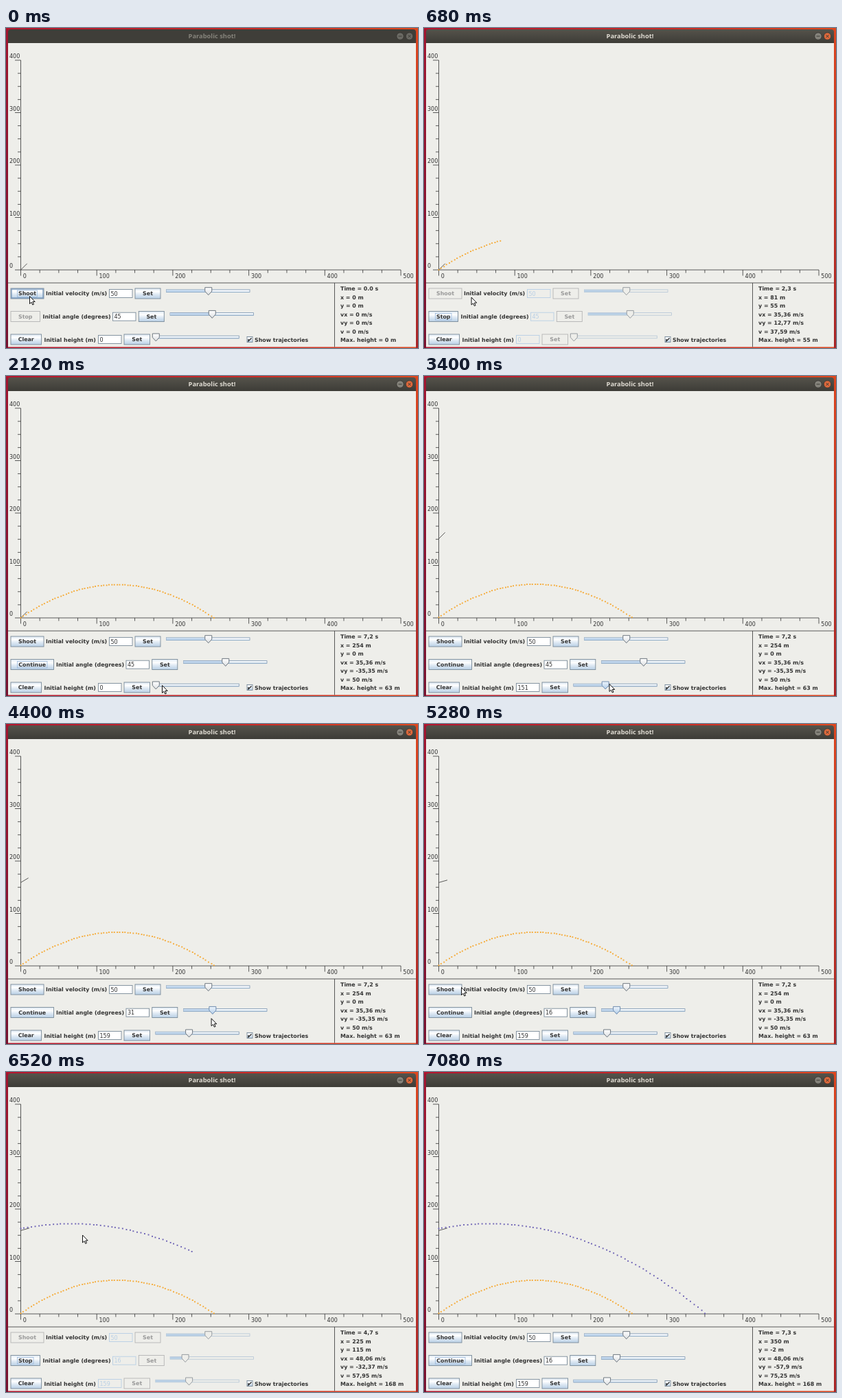
Recreate the animation shown at these times as an HTML page. Size 600 by 467 pixels, loop 8920 ms.

```html
<!DOCTYPE html>
<html lang="en">
<head>
<meta charset="utf-8">
<title>Parabolic shot!</title>
<style>
html, body { margin: 0; width: 100%; height: 100%; overflow: hidden; }
svg { display: block; width: 600px; height: 467px; }
text { font: 8px "DejaVu Sans", sans-serif; fill: #333; white-space: pre; }
.b { font-weight: bold; font-size: 7.9px; }
.title { font: bold 9.3px "Noto Sans", sans-serif; text-anchor: middle; }
.mid { text-anchor: middle; }
</style>
</head>
<body>
<svg viewBox="0 0 600 467">
  <defs>
    <linearGradient id="desk"><stop stop-color="#b3152e"/><stop offset=".6" stop-color="#c92a25"/><stop offset="1" stop-color="#df471e"/></linearGradient>
    <linearGradient id="left" x2="0" y2="1"><stop stop-color="#a01530"/><stop offset="1" stop-color="#76102f"/></linearGradient>
    <linearGradient id="right" x2="0" y2="1"><stop stop-color="#dc451e"/><stop offset="1" stop-color="#a82427"/></linearGradient>
    <linearGradient id="bar" x2="0" y2="1"><stop stop-color="#55534b"/><stop offset="1" stop-color="#3d3c37"/></linearGradient>
    <linearGradient id="btn" x2="0" y2="1"><stop stop-color="#dde8f3"/><stop offset=".3" stop-color="#fff"/><stop offset=".6" stop-color="#dde8f3"/><stop offset="1" stop-color="#b8cfe5"/></linearGradient>
    <linearGradient id="knob" x2="0" y2="1"><stop stop-color="#fff"/><stop offset="1" stop-color="#dcdfe2"/></linearGradient>
    <linearGradient id="knobOn" x2="0" y2="1"><stop stop-color="#eef5fc"/><stop offset="1" stop-color="#b0cce8"/></linearGradient>
  </defs>
  <g id="back"></g>
  <g id="live"></g>
</svg>
<script>
const LOOP = 8920, LAST = 7080, G = 9.82, DT = 0.1, STEP = 22;
const X0 = 21.5, Y0 = 353, SX = 1.107, SY = 0.765;
const BG = '#eeeeea', INK = '#333';

const SHOTS = [
  { start: 160, steps: 72, angle: 45, height: 0, color: '#f6a933' },
  { start: 5465, steps: 73, angle: 16, height: 159, color: '#6b60b4' }
];

// Pointer path: time, x, y
const PATH = [
  [0, 34, 391], [240, 34, 391], [800, 78, 393], [1360, 110, 396], [1520, 110, 396],
  [1920, 222, 454], [2120, 227, 451], [2400, 223.5, 451], [2720, 223.5, 451],
  [3400, 269.5, 449], [3520, 272, 449], [3640, 327, 432], [3720, 308, 419],
  [3920, 317, 418], [4120, 317, 418], [4720, 277.5, 442], [4840, 268, 443],
  [5240, 56, 384], [5280, 54, 384], [5440, 46, 385], [6120, 46, 385], [6760, 150, 149]
];
const HIDE = 6800;

const rect = (x, y, w, h, fill, more = '') =>
  `<rect x="${x}" y="${y}" width="${w}" height="${h}" fill="${fill}" ${more}/>`;
const line = (x1, y1, x2, y2, color = INK, w = 0.8) =>
  `<path d="M${x1} ${y1}L${x2} ${y2}" stroke="${color}" stroke-width="${w}"/>`;
const label = (x, y, s, cls = 'b', color = INK) =>
  `<text x="${x}" y="${y}" class="${cls}" style="fill:${color}">${s}</text>`;
const stroke = (color, w = 0.9) => `stroke="${color}" stroke-width="${w}"`;

function pathAt(t) {
  const i = PATH.findIndex(p => p[0] > t);
  if (i < 0) return PATH[PATH.length - 1].slice(1);
  const [a, x, y] = PATH[i - 1], [b, u, v] = PATH[i];
  const k = (t - a) / (b - a);
  return [x + (u - x) * k, y + (v - y) * k];
}

function axes() {
  let s = line(X0, 47, X0, Y0) + line(X0, Y0, X0 + 500 * SX, Y0);
  for (let m = 0; m <= 500; m += 25) {
    const big = m % 100 === 0, x = X0 + m * SX, y = Y0 - m * SY;
    s += line(x, Y0, x, Y0 + (big ? 8.5 : 4.5));
    if (big) s += label(x + 3.3, 365, m, '');
    if (m > 400) continue;
    s += line(X0, y, X0 - (big ? 8.5 : 4.5), y);
    if (big) s += label(5, y - 3, m, '');
  }
  return s;
}

function background() {
  return rect(0, 0, 600, 467, 'url(#desk)') + rect(0, 2, 3, 465, 'url(#left)') +
    rect(597, 2, 3, 465, 'url(#right)') + rect(3, 20, 594, 445.5, BG) + axes() +
    line(3, 372, 597, 372) + line(478.5, 372, 478.5, 465.5) +
    label(58, 390, 'Initial velocity (m/s)') + label(55.5, 457.5, 'Initial height (m)') +
    rect(351, 450.5, 8, 8, 'url(#btn)', stroke('#7a8a99')) +
    '<path d="M353 454v3L357.500 452.500" fill="none" stroke="#222" stroke-width="1.3"/>' +
    label(362, 457.5, 'Show trajectories');
}

function titleBar(active) {
  const c = active ? '#e06a3c' : '#6b6a64', g = active ? '#85837b' : '#6b6a64';
  const dot = (x, fill, mark) => `<circle cx="${x}" cy="12" r="5.200" fill="${fill}" stroke="#33322e" stroke-width=".7"/>` +
    `<path d="${mark}" stroke="#3b3a35" stroke-width="1"/>`;
  return `<path d="M3 22V6Q3 2 7 2H593Q597 2 597 6V22Z" fill="${active ? 'url(#bar)' : '#3f3e39'}"/>` +
    label(300, 15.2, 'Parabolic shot!', 'title', active ? '#dfdbd2' : '#85837b') +
    dot(574, g, 'M571.5 12h5') + dot(587.5, c, 'M585.500 10l4 4m0-4l-4 4');
}

function button(x, y, w, text, { off, focus, hover } = {}) {
  let s = rect(x, y, w, 15, off ? BG : 'url(#btn)', stroke(off ? '#b4b4b4' : '#7a8a99'));
  if (hover) s += rect(x + 1, y + 1, w - 2, 13, 'none', stroke('#6f8fb5', 1.2));
  if (focus) s += rect(x + 9.5, y + 3, w - 19, 9.5, 'none', stroke('#8fb0d6', 0.7));
  return s + label(x + w / 2, y + 10.4, text, 'b mid', off ? '#999' : INK);
}

function field(x, y, value, off) {
  return rect(x, y, 33.5, 12, off ? BG : '#fff', stroke(off ? '#b8cfe5' : '#7a8a99')) +
    label(x + 2, y + 9, value, '', off ? '#b8cfe5' : INK);
}

function slider(x, y, part, { off, focus } = {}) {
  const k = x + 0.5 + part * 121.5, edge = off ? '#b3c5d6' : '#7a94b0';
  return rect(x, y - 1.8, 121.5, 3.6, off ? BG : '#f4f8fc', stroke(edge, 0.8)) +
    rect(x, y - 1.5, k - x, 3, off ? '#b8cfe5' : '#c3d8ee') +
    (off ? '' : line(x, y + 1.8, x + 121.5, y + 1.8, '#8cabcb', 0.8)) +
    `<path d="M${k - 5} ${y - 5}h10v5.500l-5 5.500l-5-5.500z" fill="${focus ? 'url(#knobOn)' : off ? BG : 'url(#knob)'}" ${stroke(focus ? '#6382a8' : off ? '#8e9399' : '#5f6973')}/>`;
}

function dots(shot, n, lift) {
  const v = 50, a = shot.angle * Math.PI / 180;
  let s = '';
  for (let i = 0; i <= n; i++) {
    const q = i * DT, m = Math.floor(shot.height + v * Math.sin(a) * q - G * q * q / 2);
    const x = X0 + Math.floor(v * Math.cos(a) * q) * SX, y = Math.min(Y0 - m * SY - lift, 353);
    s += rect((x - 0.9).toFixed(1), (y - 0.9).toFixed(1), 1.9, 1.9, shot.color);
  }
  return s;
}

const num = v => String(+v.toFixed(2)).replace('.', ',');

function readout(shot, n) {
  let rows = ['0.0', 0, 0, 0, 0, 0, 0];
  if (shot) {
    const a = shot.angle * Math.PI / 180, q = n * DT;
    const vx = 50 * Math.cos(a), up = 50 * Math.sin(a), vy = up - G * q;
    const high = p => shot.height + up * p - G * p * p / 2;
    rows = [num(q), Math.trunc(vx * q + 1e-6), Math.trunc(high(q)), num(vx), num(vy),
      num(Math.hypot(vx, vy)), Math.trunc(high(Math.min(q, up / G)))];
  }
  const names = ['Time', 'x', 'y', 'vx', 'vy', 'v', 'Max. height'];
  const units = ['s', 'm', 'm', 'm/s', 'm/s', 'm/s', 'm'];
  return names.map((name, i) => label(487, 383.3 + i * 12.52, `${name} = ${rows[i]} ${units[i]}`)).join('');
}

function scene(t) {
  const [cx, cy] = pathAt(t);
  const ramp = (a, b, x0, x1) => Math.max(0, Math.min(1, (pathAt(Math.max(a, Math.min(b, t)))[0] - x0) / (x1 - x0)));
  const height = Math.round(159 * ramp(2720, 3520, 223.5, 272));
  const angle = Math.round(45 - 29 * ramp(4120, 4720, 317, 277.5));
  const count = SHOTS.map(s => Math.min(s.steps, Math.floor((t - s.start) / STEP)));
  const now = count[1] >= 0 ? 1 : count[0] >= 0 ? 0 : -1;
  const shot = SHOTS[now], off = !!shot && count[now] < shot.steps;
  const done = !!shot && !off, shift = done ? 19.5 : 0;
  const onHeight = t >= 2600 && t < 4120, onAngle = t >= 4120 && t < 5420;
  const focusRun = !!shot && !onHeight && !onAngle;

  const r = angle * Math.PI / 180, ly = Y0 - height * SY;
  let s = titleBar(t >= 80) + line(X0, ly, X0 + 13 * Math.cos(r), ly - 13 * Math.sin(r));
  SHOTS.forEach((p, i) => { if (count[i] >= 0) s += dots(p, count[i], i ? 3 : t >= 2720 ? 0.9 : 0.2); });

  s += button(7, 380, 48, 'Shoot', { off, hover: !shot || (t >= 5400 && t < SHOTS[1].start), focus: !shot }) +
    field(150.5, 381.5, 50, off) + button(188, 380, 37, 'Set', { off }) + slider(233.5, 383.7, 0.5, { off });

  s += button(7, 413.5, done ? 62.5 : 42.5, done ? 'Continue' : 'Stop', { off: !shot, focus: focusRun }) +
    label(53.5 + shift, 424, 'Initial angle (degrees)') + field(155.5 + shift, 415.2, angle, off) +
    button(193.3 + shift, 413.5, 37, 'Set', { off }) +
    slider(239 + shift, 417.4, angle / 90, { off, focus: onAngle });

  s += button(7, 447, 44.5, 'Clear') + field(134.5, 448.5, height, off) +
    button(172, 447, 37.5, 'Set', { off }) + slider(217.8, 451, height / 400, { off, focus: onHeight });

  s += readout(shot, count[now]);
  if (t < HIDE) s += `<path transform="translate(${cx} ${cy})" d="M.500 .500V11.500L3 9.200L4.800 13L6.500 12.200L4.800 8.500H8.200Z" fill="#fff" stroke="#111" stroke-width="1"/>`;
  return s;
}

// Pictures change 15 times a second on a 40 ms grid.
function snap(t) {
  const r = t % 200;
  return Math.min(LAST, t - r + (r >= 120 ? 120 : r >= 80 ? 80 : 0));
}

const live = document.getElementById('live');
document.getElementById('back').innerHTML = background();
const begin = performance.now();
let shown = -1;
function draw() {
  const t = snap((performance.now() - begin) % LOOP);
  if (t !== shown) live.innerHTML = scene(t);
  shown = t;
  requestAnimationFrame(draw);
}
draw();
</script>
</body>
</html>
```
